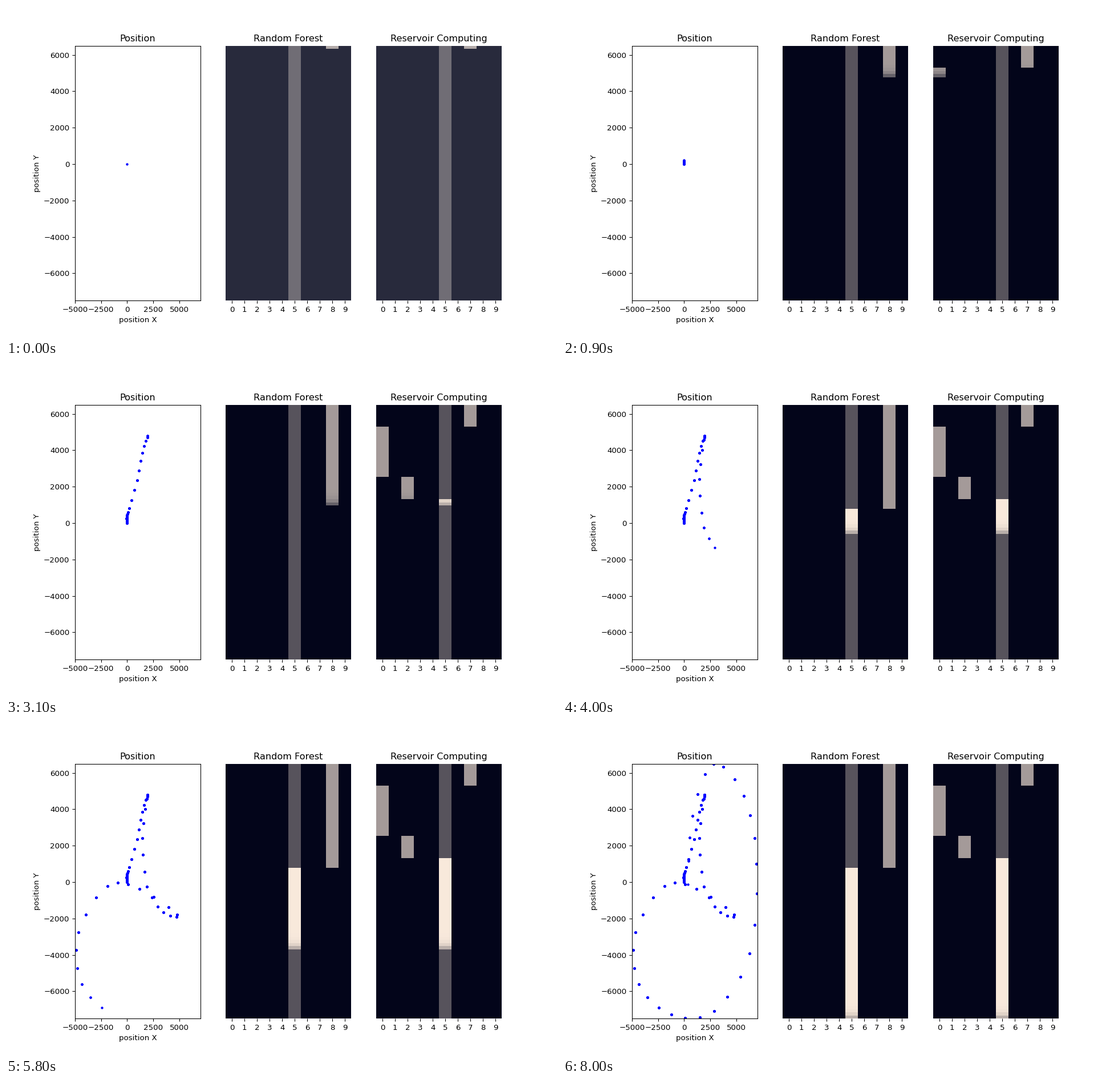
A matplotlib script for the animation above (8.1 s loop, 966 by 580 pixels).

```python
import numpy as np
import matplotlib.pyplot as plt
from matplotlib.animation import FuncAnimation

WIDTH, HEIGHT, DPI = 966, 580, 96
STEPS, CLASSES, TRUE_CLASS = 81, 10, 5
DARK, LIGHT = np.array([3, 5, 26]), np.array([250, 235, 221])
TRUTH_ALPHA, GUESS_ALPHA = 89, 102  # out of 255

# Key positions of the moving phase, evenly spaced in time.
MOVE_START, KEY_GAP = 17, 3
KEYS = np.array([
    (0, 425), (200, 815), (940, 2360), (1430, 3860), (1910, 4690),
    (1870, 4560), (1460, 2400), (1900, -240), (3470, -1670), (4790, -1790),
    (1160, -370), (-1900, -220), (-4650, -2760), (-4330, -5610),
    (-1220, -7280), (2840, -7090), (6260, -3910), (6910, 1000),
    (5690, 4730), (2780, 6490), (780, 3640), (350, -120),
])


def hermite(keys, position):
    """Smooth curve through evenly spaced keys, at fractional key indices."""
    slope = np.gradient(keys, axis=0)
    i = np.minimum(position.astype(int), len(keys) - 2)
    u = (position - i)[:, None]
    ease = u * u * (3 - 2 * u)
    return (keys[i] * (1 - ease) + keys[i + 1] * ease
            + u * (1 - u) * (slope[i] * (1 - u) - slope[i + 1] * u))


def make_path():
    """A slow creep upwards with one small sway, then the long run."""
    t = np.arange(MOVE_START)
    creep = np.column_stack([-60 * np.exp(-(t - 10.0) ** 2), 25 * t])
    moving = np.arange(STEPS - MOVE_START) / KEY_GAP
    return np.vstack([creep, hermite(KEYS, moving)])


def blend(below, lit, alpha):
    """Integer alpha blend of a two-colour map over an RGB grid."""
    colour = np.where(lit[..., None], LIGHT, DARK)
    return (colour * alpha + below * (255 - alpha)) // 255


def layered_maps(runs):
    """Colour grids per frame; runs are (class, first row after it)."""
    guess = np.zeros((STEPS, CLASSES), bool)
    first = 0
    for cls, end in runs:
        guess[first:end, cls] = True
        first = end
    truth = np.zeros_like(guess)
    truth[:, TRUE_CLASS] = True
    rows = np.arange(STEPS)[:, None]
    grid = np.full((STEPS, CLASSES, 3), 255)
    maps = []
    for t in [0, *range(STEPS)]:  # the first state is laid down twice
        grid = blend(grid, truth, TRUTH_ALPHA)
        grid = blend(grid, guess & (rows <= t), GUESS_ALPHA)
        maps.append(grid.astype(np.uint8))
    return maps[1:]


plt.rcParams["font.size"] = 10.06
fig, (pos_ax, *map_axes) = plt.subplots(
    1, 3, figsize=(WIDTH / DPI, HEIGHT / DPI), dpi=DPI)

path = make_path()
pos_ax.set(title="Position", xlabel="position X", ylabel="position Y",
           xlim=(-5000, 7000), ylim=(-7500, 6500))
dots, = pos_ax.plot([], [], "b.", markersize=4.5)

panels = []
for ax, title, runs in zip(
        map_axes, ("Random Forest", "Reservoir Computing"),
        ([(8, 33), (5, STEPS)], [(7, 7), (0, 23), (2, 30), (5, STEPS)])):
    maps = layered_maps(runs)
    mesh = ax.pcolormesh(maps[0])
    ax.set(title=title, ylim=(STEPS, 0), yticks=[])
    ax.set_xticks(np.arange(CLASSES) + 0.5, range(CLASSES))
    ax.spines[:].set_visible(False)
    panels.append((mesh, maps))


def update(t):
    # Dots are stamped again at every step, which hardens their edges.
    stamps = np.arange(t + 1, 0, -1)
    dots.set_data(*np.repeat(path[:t + 1], stamps, axis=0).T)
    for mesh, maps in panels:
        mesh.set_array(maps[t])
    return [dots, *(mesh for mesh, _ in panels)]


anim = FuncAnimation(fig, update, frames=STEPS, interval=100, repeat=True,
                     repeat_delay=0)
plt.show()
```
